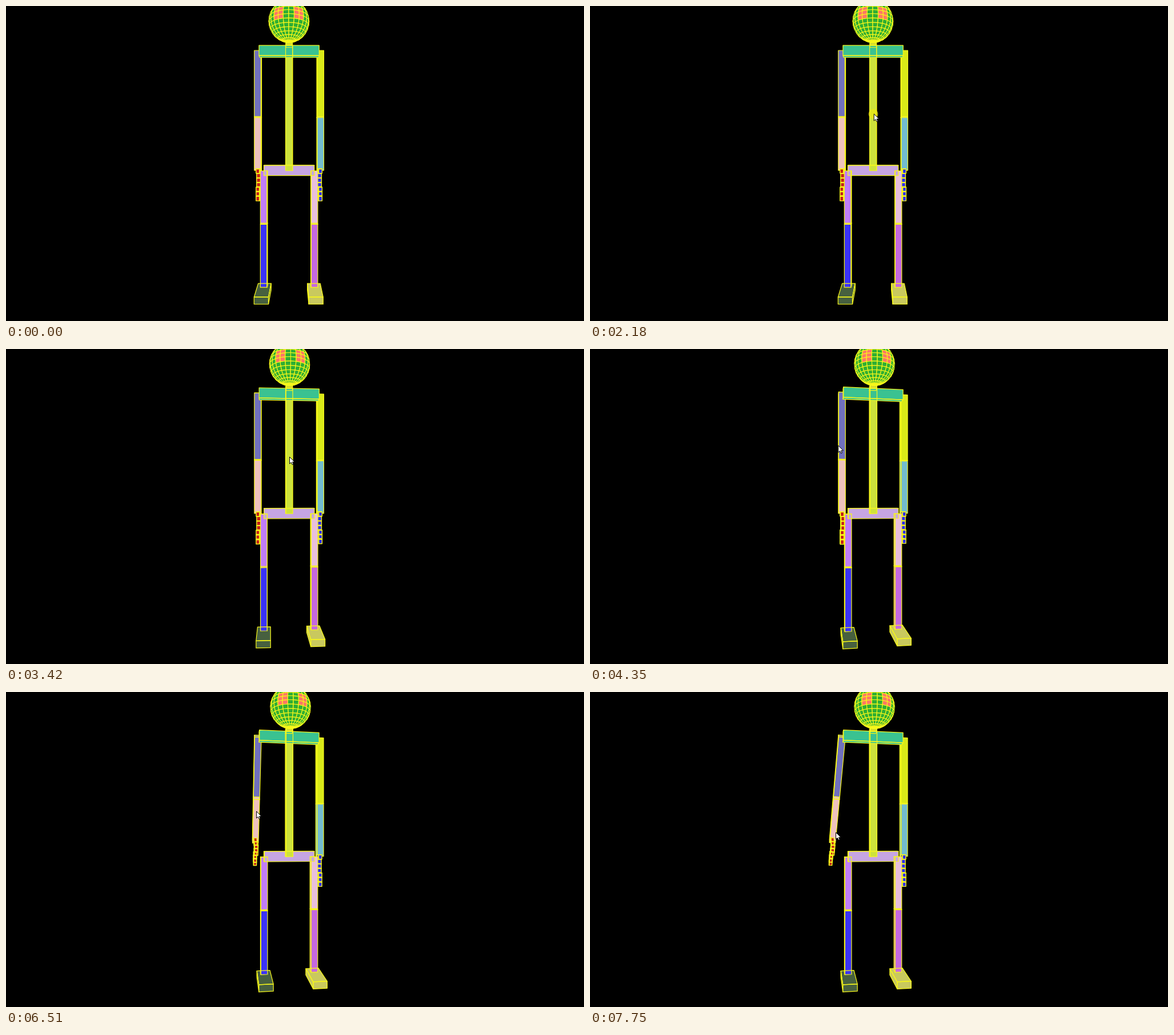
Recreate the animation shown at these times as an HTML page with a canvas. Size 1012x553 px, loop 8 s.

```html
<!DOCTYPE html>
<html>
<head>
<meta charset="utf-8">
<style>
  html, body { margin: 0; width: 100%; height: 100%; overflow: hidden; background: #000; }
  canvas { display: block; }
</style>
</head>
<body>
<canvas id="stage" width="1012" height="553"></canvas>
<script>
const ctx = document.getElementById('stage').getContext('2d');
const LOOP = 8000, STEP = 310, FIRST_STEP = 920;
const CAMERA = 276.5 / Math.tan(Math.PI / 8); // 45 degree field of view
const SHOULDER = { x: -54.5, y: -196.7 };
const HEAD = { y: -242.5, z: 18, r: 34.4, lons: 24, lats: 16 };
const SKIN = '#2fae33', EYE = '#ff7864';

// Key points as [step, ...values], linear in between
const yawPath = [[4, 0], [6, -.097], [9, .145]];
const swingPath = [[12, 0], [14, 7], [16, 27], [17, 30]];
const spreadPath = [[20, 0], [21, 3], [22, 3.8]];
const pointerPath = [
  [0, 643, 398], [1, 490, 238], [2, 497, 189], [8, 496, 189], [10, 432, 165],
  [14, 441, 181], [15, 450, 195], [18, 438, 209], [22, 430, 246]
];

let yaw, swing, spread;

function along(path, step) {
  const next = path.findIndex(key => key[0] >= step);
  if (next < 1) return path.at(next).slice(1);
  const a = path[next - 1], b = path[next];
  const f = (step - a[0]) / (b[0] - a[0]);
  return a.map((v, i) => v + (b[i] - v) * f).slice(1);
}

function project([x, y, z]) {
  const s = Math.sin(yaw), c = Math.cos(yaw);
  const scale = CAMERA / (CAMERA - z * c + x * s);
  return [506 + (x * c + z * s - 10.3) * scale, 276.5 + y * scale];
}

function swingArm([x, y, z]) {
  const dx = x - SHOULDER.x, dy = y - SHOULDER.y;
  const down = dx * Math.sin(spread) + dy * Math.cos(spread);
  return [
    SHOULDER.x + dx * Math.cos(spread) - dy * Math.sin(spread),
    SHOULDER.y + down * Math.cos(swing) + z * Math.sin(swing),
    z * Math.cos(swing) - down * Math.sin(swing)
  ];
}

// Projects a polygon; returns null when it faces away.
function face(points, color) {
  const p = points.map(project);
  const area = p.reduce((sum, [x, y], i) => {
    const [nx, ny] = p[(i + 1) % p.length];
    return sum + x * ny - nx * y;
  }, 0);
  if (area <= 0) return null;
  const path = new Path2D();
  p.forEach(([x, y]) => path.lineTo(x, y));
  path.closePath();
  return { path, color };
}

function box(color, x, half, y0, y1, z0 = -6, z1 = 6, move = p => p) {
  const l = x - half, r = x + half;
  return [
    [[l, y0, z0], [l, y0, z1], [l, y1, z1], [l, y1, z0]],
    [[r, y0, z1], [r, y0, z0], [r, y1, z0], [r, y1, z1]],
    [[l, y0, z0], [r, y0, z0], [r, y0, z1], [l, y0, z1]],
    [[l, y1, z1], [r, y1, z1], [r, y1, z0], [l, y1, z0]],
    [[l, y0, z1], [r, y0, z1], [r, y1, z1], [l, y1, z1]]
  ].map(corners => face(corners.map(move), color));
}

function head() {
  const { y, z, r, lons, lats } = HEAD;
  const point = (i, j) => {
    const a = Math.PI * i / lats, b = 2 * Math.PI * j / lons;
    return [r * Math.sin(a) * Math.sin(b), y - r * Math.cos(a), z + r * Math.sin(a) * Math.cos(b)];
  };
  const faces = [];
  for (let i = 0; i < lats; i++)
    for (let j = -lons / 2; j < lons / 2; j++) {
      const across = Math.abs(j + .5);
      const isEye = i > 5 && i < 9 && across > 1 && across < 3;
      faces.push(face([point(i, j), point(i, j + 1), point(i + 1, j + 1), point(i + 1, j)],
        isEye ? EYE : SKIN));
    }
  return faces;
}

// All fills first, so that edges of touching boxes stay visible.
function paint(faces, width) {
  const shown = faces.flat().filter(Boolean);
  for (const f of shown) { ctx.fillStyle = f.color; ctx.fill(f.path); }
  ctx.strokeStyle = '#f8f81a';
  ctx.lineWidth = width;
  ctx.lineJoin = 'round';
  for (const f of shown) ctx.stroke(f.path);
}

function arm(side, upper, lower, hand, move) {
  const x = side * 54.5, segments = [];
  for (let i = 0; i < 7; i++) {
    const palm = i > 0 && i < 4, top = 9.4 + 8 * i;
    segments.push(box(hand, x - side * (palm ? 1.9 : .2), palm ? 3.7 : 3, top, top + 7.6, -10, 6, move));
  }
  paint([
    box(upper, x, 5.8, SHOULDER.y, -81.3, -6, 6, move),
    box(lower, x, 5.8, -81.3, 12, -6, 6, move)
  ], 1.2);
  paint(segments, 1.4);
}

function leg(side, thigh, shin, foot) {
  const x = side * 44;
  return [
    box(foot, x, 11.6, 215.5, 227, -15.7, 54),
    box(shin, x, 5.8, 105.6, 215.5),
    box(thigh, x, 5.8, 12.9, 105.6)
  ];
}

function body() {
  arm(-1, '#7070be', '#eec2bd', '#c4201c', swingArm);
  arm(1, '#d9ea18', '#72bccf', '#2c2cf6');
  paint([
    ...leg(-1, '#c07df8', '#3a32f8', '#47603f'),
    ...leg(1, '#e8bfdc', '#c568e0', '#c9c95e'),
    box('#d8dc2c', 0, 5.8, -212, -205.6),
    box('#c6a5e3', 0, 43.8, 3, 21),
    box('#cde23c', 0, 6, -205.6, 12.4),
    box('#3ac291', 0, 52.2, -205.6, -187.9)
  ], 1.2);
  paint(head(), 1);
}

function pointer(x, y) {
  const outline = [[0, 0], [0, 12], [2.8, 9.5], [4.8, 13.6], [6.7, 12.7], [4.9, 8.8], [8.6, 8.6]];
  ctx.beginPath();
  outline.forEach(([dx, dy]) => ctx.lineTo(x + .5 + dx, y + .5 + dy));
  ctx.closePath();
  ctx.fillStyle = '#fff';
  ctx.fill();
  ctx.strokeStyle = '#000';
  ctx.lineWidth = 1;
  ctx.stroke();
}

function clickMark(x, y) {
  ctx.fillStyle = 'rgba(245, 235, 10, .6)';
  ctx.beginPath();
  ctx.arc(x, y, 8.5, 0, 2 * Math.PI);
  ctx.fill();
}

function render(now) {
  const step = Math.floor((now % LOOP - FIRST_STEP) / STEP);
  yaw = Math.asin(along(yawPath, step)[0]);
  swing = along(swingPath, step)[0] * Math.PI / 180;
  spread = along(spreadPath, step)[0] * Math.PI / 180;

  ctx.fillStyle = '#000';
  ctx.fillRect(0, 0, 1012, 553);
  body();
  if (step === 4) clickMark(496, 189.5);
  if (step >= 0) pointer(...along(pointerPath, step));
}

const start = performance.now();
(function tick() {
  render(performance.now() - start);
  requestAnimationFrame(tick);
})();
</script>
</body>
</html>
```
